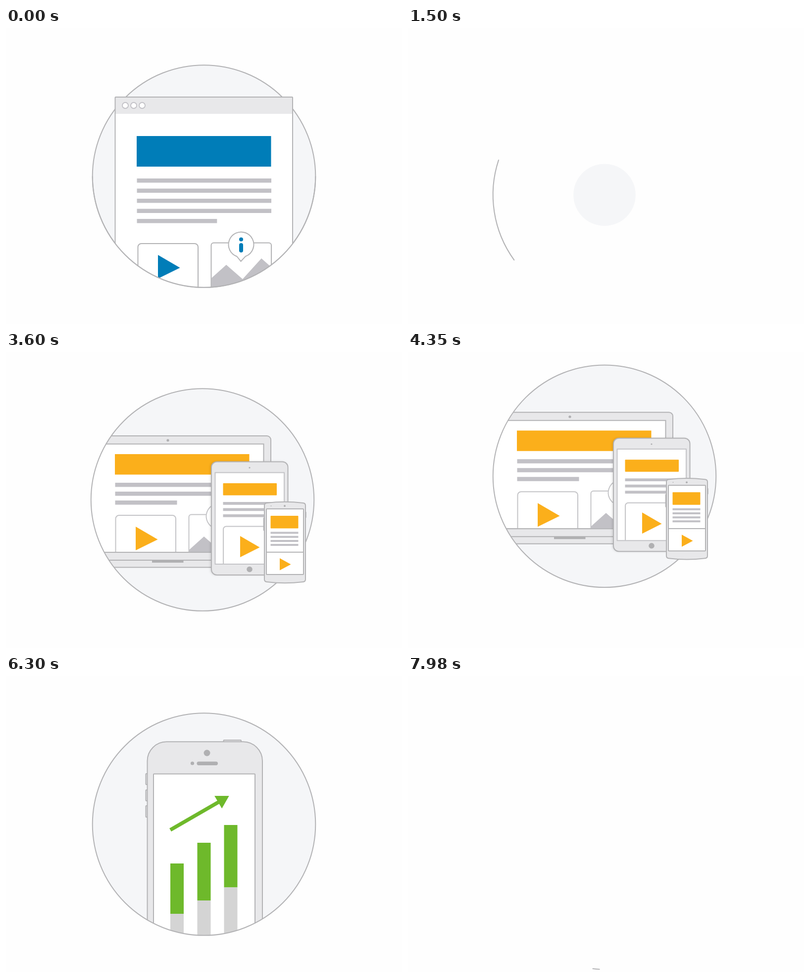
Write an HTML page with a canvas that moves like this. It is 800 by 600 pixels and loops after 8 s.

```html
<!DOCTYPE html>
<html lang="en">
<head>
<meta charset="utf-8">
<title>Devices</title>
<style>
html, body { margin: 0; width: 100%; height: 100%; overflow: hidden; background: #fefefe; }
canvas { display: block; width: 800px; height: 600px; }
</style>
</head>
<body>
<canvas id="stage" width="800" height="600"></canvas>
<script>
const g = document.getElementById('stage').getContext('2d');
const LOOP = 8000, R = 225.3, TAU = Math.PI * 2;
const LINE = '#b3b3b5', SOFT = '#c4c4c7', TEXT = '#c2c1c6', BODY = '#e8e8ea', KNOB = '#b0b0b2';
const BLUE = '#007db8', ORANGE = '#fbaf1b', GREEN = '#6eb92b';

// Easing
const clamp = x => Math.max(0, Math.min(1, x));
const span = (t, start, length) => clamp((t - start) / length);
const left = (t, start, end, power = 3) => (1 - span(t, start, end - start)) ** power;

// Cubic bezier ease with handles (a, 0) and (c, 1)
function ease(x, a, c) {
  let lo = 0, hi = 1;
  for (let i = 0; i < 24; i++) {
    const s = (lo + hi) / 2, r = 1 - s;
    if (3 * a * s * r * r + 3 * c * s * s * r + s * s * s < x) lo = s; else hi = s;
  }
  return lo * lo * (3 - 2 * lo);
}

// Drawing helpers
function paint(fill, stroke, width = 2) {
  if (fill) { g.fillStyle = fill; g.fill(); }
  if (stroke) { g.strokeStyle = stroke; g.lineWidth = width; g.stroke(); }
}
function box(x0, y0, x1, y1, fill, stroke, r = 0, width) {
  g.beginPath();
  g.roundRect(x0, y0, x1 - x0, y1 - y0, r);
  paint(fill, stroke, width);
}
function dot(x, y, r, fill, stroke, width) {
  g.beginPath();
  g.arc(x, y, r, 0, TAU);
  paint(fill, stroke, width);
}
function poly(points, fill) {
  g.beginPath();
  points.forEach(p => g.lineTo(...p));
  g.closePath();
  paint(fill);
}
function rule(y, x0, x1) {
  g.beginPath();
  g.moveTo(x0, y);
  g.lineTo(x1, y);
  paint(null, LINE);
}
function group(draw) { g.save(); draw(); g.restore(); }
function clipBox(x0, y0, x1, y1) {
  g.beginPath();
  g.rect(x0, y0, x1 - x0, y1 - y0);
  g.clip();
}
function clipDisc(c) {
  g.beginPath();
  g.arc(c.x, c.y, R, 0, TAU);
  g.clip();
}
function textRows(x0, x1, y, gap, height, count) {
  for (let i = 0; i < count; i++) box(x0, y + i * gap, x1, y + i * gap + height, TEXT);
}
function grow(x, y, k, draw) {
  if (k <= 0) return;
  group(() => {
    g.translate(x, y);
    g.scale(k, k);
    g.translate(-x, -y);
    draw();
  });
}

function ring(c, p) {
  g.beginPath();
  if (p >= 0.9995) g.arc(c.x, c.y, R, 0, TAU);
  else if (p > 0) g.arc(c.x, c.y, R, TAU * (0.25 + p), TAU * (0.25 + 2 * p));
  else return;
  g.lineCap = 'round';
  paint(null, LINE);
  g.lineCap = 'butt';
}

// Video card and picture card with an info pin
function cards(accent, info, line) {
  box(266.5, 437, 388, 580, '#fff', line, 7);
  poly([[307, 460], [307, 508], [351.5, 486]], accent);
  box(414.5, 435.5, 536, 580, '#fff', line, 5);
  poly([[415, 507], [445, 480], [478, 509], [516, 467], [535, 484], [535, 580], [415, 580]], TEXT);
  g.beginPath();
  g.arc(475, 439, 25.5, TAU * 0.305, TAU * 1.195);
  g.lineTo(474.5, 473);
  g.closePath();
  paint('#fff', line);
  dot(475, 428.5, 4, info);
  box(471, 436, 479, 455, info, null, 4);
}

function browserScene(c) {
  ring(c, 1);
  group(() => {
    g.beginPath();
    g.rect(0, 0, 800, c.y);
    g.arc(c.x, c.y, R, 0, Math.PI);
    g.clip();
    box(220.5, 140, 579, 600, '#fff');
    box(220.5, 140, 579, 174, BODY);
    box(220.5, 140, 579, 600, null, LINE, 1);
    [241, 258, 275].forEach(x => dot(x, 157, 6, '#fff', TEXT, 1.8));
    box(264, 219, 535.5, 281, BLUE);
    textRows(264.5, 536, 305, 20.5, 8.5, 4);
    textRows(264.5, 426.3, 387, 0, 8.5, 1);
    cards(BLUE, BLUE, LINE);
  });
  g.beginPath();
  g.arc(c.x, c.y, R, 0, Math.PI);
  paint(null, LINE);
}

function laptop(u) {
  g.translate(-440 * left(u, 1300, 1850, 4), 0);
  box(0, 170, 535, 425, BODY, LINE, 8);
  dot(327, 179, 2.6, KNOB);
  box(0, 186.5, 520.5, 406, '#fff', LINE);
  group(() => {
    clipBox(0, 187.5, 519.5, 405);
    g.translate(-400 * left(u, 1750, 2558), 0);
    box(220, 207, 491.5, 248.5, ORANGE);
    textRows(220.5, 492, 265, 18, 8.4, 2);
    textRows(220.5, 345.5, 301, 0, 8.4, 1);
    g.translate(-45, -106);
    cards(ORANGE, TEXT, SOFT);
  });
  box(0, 406, 500, 436.5, BODY, LINE);
  rule(422, 0, 500);
  box(295, 422, 358.5, 427, KNOB);
}

function tablet(u) {
  group(() => {
    g.shadowColor = 'rgba(0,0,0,.14)';
    g.shadowBlur = 5;
    g.shadowOffsetX = -2;
    box(415, 222.5, 569.5, 452, BODY, null, 11);
  });
  box(415, 222.5, 569.5, 452, BODY, LINE, 11);
  dot(492, 234.5, 1.6, KNOB);
  dot(492, 440.5, 5.8, KNOB);
  box(422.5, 244.5, 562, 430, '#fff');
  group(() => {
    clipBox(423, 245, 561.5, 429.5);
    g.translate(-150 * left(u, 2190, 2900), 0);
    box(438.5, 266, 547, 290.5, ORANGE, null, 1);
    textRows(438.5, 547, 304, 12.5, 5.8, 3);
    box(439, 353.5, 547, 480, '#fff', SOFT, 6);
    poly([[473, 373], [473, 416], [512.5, 396]], ORANGE);
  });
  box(422.5, 244.5, 562, 430, null, SOFT);
}

function phone(u) {
  box(520.5, 336, 523, 362, BODY, LINE, 1, 1.5);
  box(603, 324, 606, 336, BODY, LINE, 1, 1.5);
  g.beginPath();
  g.moveTo(522, 311);
  g.quadraticCurveTo(522, 306.5, 527, 306);
  g.quadraticCurveTo(563, 301.5, 600, 306);
  g.quadraticCurveTo(605, 306.5, 605, 311);
  g.lineTo(605, 461);
  g.quadraticCurveTo(605, 465.5, 600, 466);
  g.quadraticCurveTo(563, 470.5, 527, 466);
  g.quadraticCurveTo(522, 465.5, 522, 461);
  g.closePath();
  paint(BODY, LINE);
  dot(563, 312, 2, KNOB);
  dot(535.5, 312, 0.9, KNOB);
  box(526, 318, 601, 451, '#fff');
  group(() => {
    clipBox(526, 318, 601, 451);
    g.translate(-80 * left(u, 2420, 3190), 0);
    box(534.5, 332, 590.5, 357.5, ORANGE, null, 1);
    textRows(534.5, 590.5, 364.5, 8.2, 4, 4);
    rule(405.7, 526, 601);
    poly([[553, 418], [553, 442.5], [575.5, 430.5]], ORANGE);
  });
  box(526, 318, 601, 451, null, LINE, 1);
}

function deviceScene(c, u, p) {
  group(() => { clipDisc(c); laptop(u); });
  ring(c, p);
  grow(492, 337, 1 - left(u, 1480, 1900), () => tablet(u));
  grow(563, 386, 1 - left(u, 1600, 2020), () => phone(u));
}

function chart(u) {
  const rest = 0.0852;
  const low = left(u, 1610, 2860) - rest;
  [[332, 380, 482, 150], [386.5, 338, 455, 190], [440.5, 302, 428.5, 225]].forEach(([x, top, mid, rise]) => {
    const dy = rise * low;
    box(x, top + dy, x + 27, mid + dy, GREEN);
    box(x, mid + dy, x + 27, 600, '#d4d4d4');
  });
  if (u < 1798) return;
  const k = 22 - 158 * left(u, 1798, 2860);
  const dx = k * 0.866, dy = -k * 0.5;
  g.beginPath();
  g.moveTo(332, 312);
  g.lineTo(Math.max(332, 432 + dx), Math.min(312, 254 + dy));
  paint(null, GREEN, 7.5);
  poly([[421 + dx, 243 + dy], [450.5 + dx, 243 + dy], [436 + dx, 268.5 + dy]], GREEN);
}

function growthScene(c, u, p) {
  group(() => {
    clipDisc(c);
    group(() => {
      g.translate(0, 420 * left(u, 1200, 1800, 4));
      box(439.5, 130, 475, 140, BODY, LINE, 1);
      [[198, 220], [231, 253], [263, 286]].forEach(([a, b]) => box(282.5, a, 290, b, BODY, LINE, 1));
      box(285.5, 133.3, 518, 700, BODY, LINE, 39);
      dot(406, 156, 6.5, KNOB);
      dot(376.5, 177, 3.6, KNOB);
      box(385.5, 173.5, 428, 181, KNOB, null, 3.7);
      box(298, 198.5, 503, 700, '#fff', LINE, 1);
      clipBox(299, 199.5, 502, 700);
      chart(u);
    });
  });
  ring(c, p);
}

// Each scene enters while the one before it leaves
const scenes = [
  { x: 400, y: 300.5, from: -9000, out: 420, draw: browserScene },
  { x: 397, y: 299.5, from: 420, out: 3990, draw: deviceScene },
  { x: 400, y: 300.5, from: 3990, out: 7020, draw: growthScene },
  { x: 400, y: 300.5, from: 7020, out: 99999, draw: ring }
];

function drawScene(s, t) {
  const u = t - s.from, v = t - s.out;
  if (u < 900 || v > 900) return;
  const rise = 39 * (Math.max(0, 1854 - u) / 774) ** 4;
  const exit = v > -30 ? 560 * ease(span(v, -30, 1218), 0.832, 0.168) : 0;
  const p = ease(span(u, 922, 1014), 0.2315, 0.333);
  const size = ease(span(u, 960, 541), 0.2315, 0.333);
  group(() => {
    g.translate(0, rise - exit);
    if (size > 0) dot(s.x, s.y, R * size, '#f5f6f8');
    if (s.draw === ring) ring(s, p);
    else s.draw(s, u, p);
  });
}

function frame(now) {
  const t = now % LOOP;
  g.fillStyle = '#fefefe';
  g.fillRect(0, 0, 800, 600);
  scenes.forEach(s => drawScene(s, t));
  requestAnimationFrame(step);
}
const begin = performance.now();
function step() { frame(performance.now() - begin); }
step();
</script>
</body>
</html>
```
